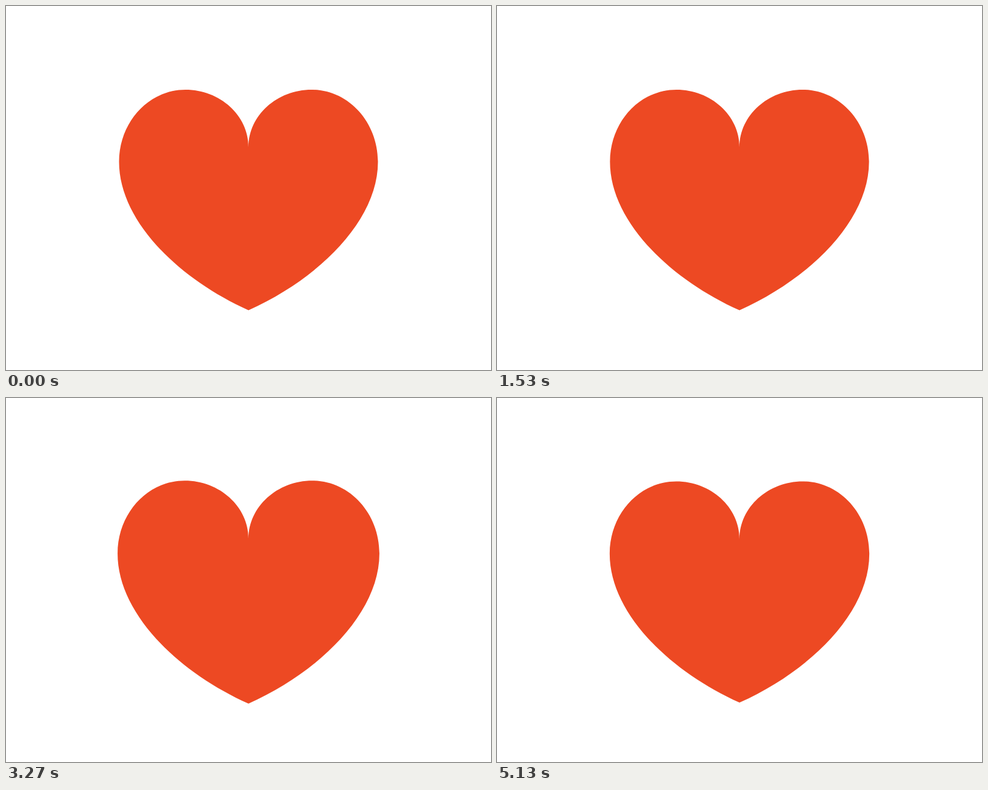
An HTML page for the animation above (5.19 s loop, 800 by 600 pixels).

```html
<!DOCTYPE html>
<html lang="en">
<head>
<meta charset="utf-8">
<title>Heartbeat</title>
<style>
  html, body { margin: 0; width: 100%; height: 100%; overflow: hidden; background: #fff; }
  svg { display: block; width: 100%; height: 100%; }
</style>
</head>
<body>
<svg viewBox="0 0 800 600" fill="#ed4923">
  <defs>
    <path id="big" d="M0-66C0-118-47-160.5-104-160.5C-164.5-160.5-213.5-107.5-213.5-41.5C-213.5 54-118 150 0 203C118 150 213.5 54 213.5-41.5C213.5-107.5 164.5-160.5 104-160.5C47-160.5 0-118 0-66Z"/>
    <path id="mini" d="M0-11C-2.5-15.5-6.5-18-10.5-18C-16-18-20-13.5-20-7C-20 5-10 14 0 18C10 14 20 5 20-7C20-13.5 16-18 10.5-18C6.5-18 2.5-15.5 0-11Z"/>
    <circle id="dot" r="23"/>
  </defs>
  <g id="burst"></g>
  <use id="ghost" href="#big"/>
  <use id="heart" href="#big"/>
</svg>
<script>
const LOOP = 5190, FPS = 15, BEAT = 1815, FIRST = 27;
const SMALL = 213.5, GROWTH = 39.2;

// Each group flies out from the centre to its end offsets.
const groups = [
  { shape: 'mini', delay: 28, span: 570,
    ends: [[0, -229], [276, -235], [394, -18], [394, 141], [256, 234]] },
  { shape: 'mini', delay: 105, span: 630,
    ends: [[-324, -258], [-324, 179], [-184, 258], [93, 320], [-272, -41]] },
  { shape: 'dot', delay: 105, span: 630,
    ends: [[-346, -166], [308, 145], [71, 302]] },
  { shape: 'dot', delay: 135, span: 590,
    ends: [[386, -168], [178, -267], [-328, 61]] }
];

const $ = id => document.getElementById(id);
const clamp = x => Math.min(1, Math.max(0, x));
const outCubic = x => 1 - (1 - x) ** 3;
const inOutQuad = x => x < .5 ? 2 * x * x : 1 - 2 * (1 - x) ** 2;

for (const g of groups) {
  g.nodes = g.ends.map(() => {
    const node = document.createElementNS('http://www.w3.org/2000/svg', 'use');
    node.setAttribute('href', '#' + g.shape);
    $('burst').append(node);
    return node;
  });
}

function place(node, x, y, scale, opacity) {
  node.setAttribute('transform', `translate(${x} ${y}) scale(${scale})`);
  node.setAttribute('opacity', opacity);
}

function draw(ms) {
  const step = Math.floor((ms % LOOP + 3.4) * FPS / 1000);
  const time = step * 1000 / FPS - FIRST;
  const p = time < 0 ? 0 : time % BEAT;

  const grow = 1 - 2 ** (-p / 125);
  const shrink = inOutQuad(clamp((p - 930) / 600));
  const half = SMALL + GROWTH * grow * (1 - shrink);
  place($('heart'), 400, 298.5, half / SMALL, 1);

  const spread = outCubic(clamp((p - 28) / 570));
  const fade = clamp((514 - p) / 378) ** 2;
  place($('ghost'), 400, 298.5, (184 + 100 * spread) / SMALL, p > 28 ? fade : 0);

  for (const g of groups) {
    const k = outCubic(clamp((p - g.delay) / g.span));
    g.nodes.forEach((node, i) => {
      const [x, y] = g.ends[i];
      place(node, 400 + x * k, 300 + y * k, 1, k > 0 ? 1 - k : 0);
    });
  }
}

const start = performance.now();
function tick() {
  draw(performance.now() - start);
  requestAnimationFrame(tick);
}
tick();
</script>
</body>
</html>
```
